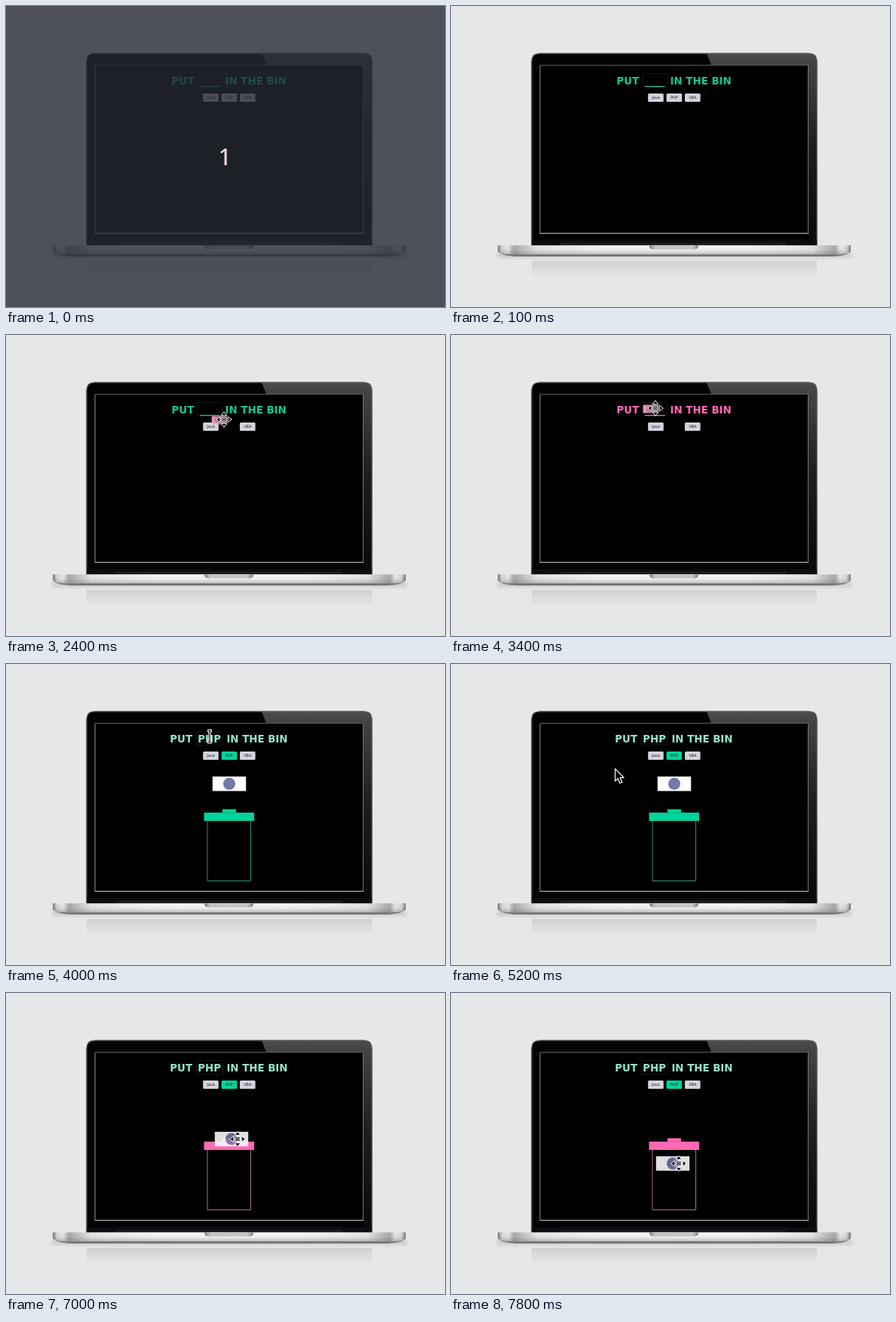
An HTML page for the animation above (8 s loop, 582x399 px).

```html
<!DOCTYPE html>
<html lang="en">
<head>
<meta charset="utf-8">
<title>Put it in the bin</title>
<style>
  html, body { margin: 0; width: 100%; height: 100%; overflow: hidden; background: #e6e7e9; }
  svg { display: block; width: 582px; height: 399px; }
  text { white-space: pre; }
  .title { font: bold 13.35px "DejaVu Sans", sans-serif; }
  .label { font: 5px "DejaVu Sans", sans-serif; text-anchor: middle; fill: #1c1c22; }
  .count { font: 31px "Noto Sans", sans-serif; text-anchor: middle; }
</style>
</head>
<body>
<svg viewBox="0 0 582 399">
  <defs>
    <linearGradient id="glare" x2="0" y2="1">
      <stop stop-color="#4c4c4e"/><stop offset="1" stop-color="#414143"/>
    </linearGradient>
    <linearGradient id="side" x2="0" y2="1">
      <stop stop-color="#434345"/><stop offset=".45" stop-color="#1d1d22"/><stop offset="1" stop-color="#08080b"/>
    </linearGradient>
    <linearGradient id="base">
      <stop stop-color="#77777a"/><stop offset=".012" stop-color="#d8d8da"/>
      <stop offset=".03" stop-color="#e8e8ea"/><stop offset=".045" stop-color="#a9a9ac"/>
      <stop offset=".11" stop-color="#e6e6e8"/><stop offset=".3" stop-color="#f6f6f8"/>
      <stop offset=".7" stop-color="#f6f6f8"/><stop offset=".89" stop-color="#e6e6e8"/>
      <stop offset=".955" stop-color="#a9a9ac"/><stop offset=".97" stop-color="#e8e8ea"/>
      <stop offset=".988" stop-color="#d8d8da"/><stop offset="1" stop-color="#77777a"/>
    </linearGradient>
    <linearGradient id="shade" x2="0" y2="1">
      <stop stop-color="#55565e" stop-opacity="0"/><stop offset=".5" stop-color="#55565e" stop-opacity=".05"/>
      <stop offset="1" stop-color="#55565e" stop-opacity=".3"/>
    </linearGradient>
    <linearGradient id="under" x2="0" y2="1">
      <stop stop-color="#a9a9ae"/><stop offset="1" stop-color="#6a6a70"/>
    </linearGradient>
    <linearGradient id="notch">
      <stop stop-color="#77777a"/><stop offset=".12" stop-color="#c6c6c8"/>
      <stop offset=".88" stop-color="#c6c6c8"/><stop offset="1" stop-color="#77777a"/>
    </linearGradient>
    <linearGradient id="mirror" x2="0" y2="1">
      <stop stop-color="#d0d1d3"/><stop offset="1" stop-color="#e6e7e9"/>
    </linearGradient>
    <linearGradient id="fade">
      <stop stop-color="#f09cc4"/><stop offset="1" stop-color="#f09cc4" stop-opacity=".45"/>
    </linearGradient>
    <filter id="soft" x="-5%" y="-200%" width="110%" height="500%"><feGaussianBlur stdDeviation="2"/></filter>
  </defs>

  <rect width="582" height="399" fill="#e6e7e9"/>

  <!-- laptop -->
  <rect x="107" y="338" width="378" height="22" fill="url(#mirror)"/>
  <rect x="60" y="328" width="472" height="6" rx="3" fill="#cbccce" filter="url(#soft)"/>
  <path d="M106.5 318V74Q106.5 62.6 118 62.6H474Q485.5 62.6 485.5 74V318Z" fill="#030305"/>
  <path d="M474 78H485V318H474Z" fill="url(#side)"/>
  <path d="M339 63H474Q485 63 485 74V80H474V78H345Z" fill="url(#glare)"/>
  <path d="M107 318V74Q107 63.1 118 63.1H474Q485 63.1 485 74V318" fill="none" stroke="#66666b"/>
  <path d="M107.5 310H484.5V318H107.5Z" fill="#0d0d11"/>
  <path d="M145 313.5H445V318H145Z" fill="#1b1b1f"/>
  <rect x="118" y="78" width="356" height="224"/>
  <path d="M118 78.5H474" stroke="#5c5c60"/>
  <path d="M118 79V301.5" stroke="#8f8f94"/>
  <path d="M473.5 79V301" stroke="#77777b"/>
  <path d="M118 301.3H474" stroke="#d4d4d6"/>
  <path d="M62 325H530Q526 332 500 332H92Q66 332 62 325Z" fill="url(#under)"/>
  <path id="deck" d="M62 317.5H530V325Q528 328.5 514 328.5H78Q64 328.5 62 325Z" fill="url(#base)"/>
  <use href="#deck" style="fill:url(#shade)"/>
  <path d="M62 317.5H530V325Q528 328.5 514 328.5H78Q64 328.5 62 325Z" fill="url(#shade)"/>
  <path d="M263 317.5H328Q328 322.7 322 322.7H269Q263 322.7 263 317.5Z" fill="url(#notch)"/>

  <!-- page -->
  <g id="title" class="title">
    <text id="put" y="103.7">PUT</text>
    <text id="word" y="103.7"></text>
    <text id="rest" y="103.7">IN THE BIN</text>
  </g>
  <rect id="slot" y="89.5" height="18" fill="none" stroke="#2b2b2d" stroke-dasharray="1 1"/>
  <g id="buttons"></g>
  <g id="bin">
    <path id="can" d="M267 208V287.5H324.5V208" fill="none"/>
    <path id="lid" d="M287 197V192.5H305V197H329V208H262.5V197Z"/>
    <path d="M287 197H305" stroke="#000" stroke-opacity=".25" stroke-width=".7"/>
  </g>
  <g id="card">
    <rect x="-22.2" y="-9.6" width="44.4" height="19.2" fill="#fff"/>
    <circle r="8" fill="#7479aa"/>
  </g>
  <g id="ghost">
    <rect x="-10.3" y="-5.6" width="20.6" height="11.2" rx="1.5" fill="url(#fade)"/>
    <text class="label" y="1.8" opacity=".6">PHP</text>
  </g>

  <!-- pointers -->
  <g id="arrow">
    <path d="M.6.8V17.2L4.4 13.7L7 20L9.8 18.8L7.2 12.7H12.2Z" fill="#000" stroke="#fff" stroke-width="1.2" stroke-linejoin="round"/>
  </g>
  <g id="move" stroke="#fff" stroke-linejoin="round"></g>
  <g id="beam" fill="none">
    <path d="M-3-7.5H3M0-7.5V7.5M-3 7.5H3" stroke="#fff" stroke-width="3.4"/>
    <path d="M-2.4-7.5H2.4M0-7.5V7.5M-2.4 7.5H2.4" stroke="#000" stroke-width="1.2"/>
  </g>

  <g id="intro">
    <rect width="582" height="399" fill="#262932" fill-opacity=".79"/>
    <text class="count" x="291" y="211" fill="#a34b50">1</text>
    <text class="count" x="290" y="211" fill="#e4e5e8">1</text>
  </g>
</svg>
<script>
const LOOP = 8000, STEP = 100;
const GREEN = '#00d39b', PINK = '#ff69b4';
const $ = id => document.getElementById(id);
const set = (el, attrs) => { for (const k in attrs) el.setAttribute(k, attrs[k]); };
const show = (el, on) => { el.style.display = on ? '' : 'none'; };
const place = (el, x, y) => set(el, { transform: `translate(${x} ${y})` });

// start, steps, pointer, from, bend, to
const moves = [
  [700, 3, 'arrow', [38, 188], [130, 188], [186, 188]],
  [1200, 4, 'arrow', [205, 180], [252, 150], [292, 127]],
  [1600, 1, 'move', [304, 121]],
  [2400, 3, 'move', [289, 112], [283, 107], [277, 103]],
  [2800, 1, 'move', [271, 97]],
  [3400, 2, 'move', [271, 97], [270, 97], [270, 96]],
  [3900, 1, 'beam', [270, 96]],
  [4700, 6, 'arrow', [262, 101], [232, 124], [217, 138]],
  [5300, 4, 'arrow', [222, 149], [238, 168], [268, 167]],
  [5700, 3, 'move', [285, 163], [297, 160], [303, 159]],
  [6500, 8, 'move', [303, 159], [304, 175], [310, 214]],
  [7400, 1, 'move', [306, 220]],
  [7500, 1, 'move', [298, 225]],
  [7800, 1, 'move', [302, 226]]
];

$('buttons').innerHTML = ['Java', 'PHP', 'VBA'].map((name, i) => `
  <g id="btn${name}" transform="translate(${271.5 + i * 24.4} 121.5)">
    <rect x="-10.3" y="-5.6" width="20.6" height="11.2" rx="1.5" fill="#d3d3dc"/>
    <text class="label" y="1.8">${name}</text>
  </g>`).join('');

$('move').innerHTML = [0, 90, 180, 270].map(a =>
  `<path d="M0-10.2L3.9-5.2H-3.9Z" transform="rotate(${a})"/>`).join('') +
  '<rect x="-3" y="-3" width="6" height="6"/><circle r="1.5" stroke-width=".8"/>';

const phpButton = $('btnPHP');

function pointerAt(t) {
  const move = moves.filter(m => m[0] <= t).pop();
  if (!move) return null;
  const [start, steps, kind, a, b = a, c = a] = move;
  const k = Math.min(steps - 1, Math.floor((t - start) / STEP));
  const u = steps > 1 ? k / (steps - 1) : 0;
  const mix = i => (1 - u) ** 2 * a[i] + 2 * u * (1 - u) * b[i] + u * u * c[i];
  return { kind, x: mix(0), y: mix(1) };
}

function drawTitle(done, over) {
  $('word').textContent = done ? 'PHP' : '____';
  set($('put'), { x: done ? 217.3 : 219.6 });
  set($('word'), { x: done ? 254.3 : 257 });
  set($('rest'), { x: done ? 292.4 : 290.6 });
  set($('slot'), { x: done ? 252.5 : 254.5, width: done ? 35 : 32 });
  set($('title'), { fill: done ? '#93e3c9' : over ? PINK : '#16c495' });
}

function draw(t) {
  const p = pointerAt(t);
  const dropped = t >= 3900;
  const dragWord = t >= 2400 && !dropped;
  const dragCard = t >= 6500;
  const overBin = t >= 7000;

  show($('intro'), t < 100);
  drawTitle(dropped, t >= 2500);

  show(phpButton, !dragWord);
  set(phpButton.firstElementChild, { fill: dropped ? GREEN : '#d3d3dc' });
  show($('ghost'), dragWord);
  if (dragWord) place($('ghost'), p.x - 6, p.y + 1);

  show($('bin'), dropped);
  set($('lid'), { fill: overBin ? PINK : GREEN });
  set($('can'), { stroke: overBin ? '#a8717f' : '#348b70' });

  show($('card'), dropped);
  set($('card'), { opacity: dragCard ? .88 : 1 });
  if (t >= 7500) place($('card'), 294, 226);
  else if (dragCard) place($('card'), p.x - 8, p.y);
  else place($('card'), 296, 158.8);

  for (const kind of ['arrow', 'move', 'beam']) {
    const on = p && p.kind === kind;
    show($(kind), on);
    if (on) place($(kind), p.x, p.y);
  }
}

const began = performance.now();
function tick() {
  draw((performance.now() - began) % LOOP);
  requestAnimationFrame(tick);
}
tick();
</script>
</body>
</html>
```
